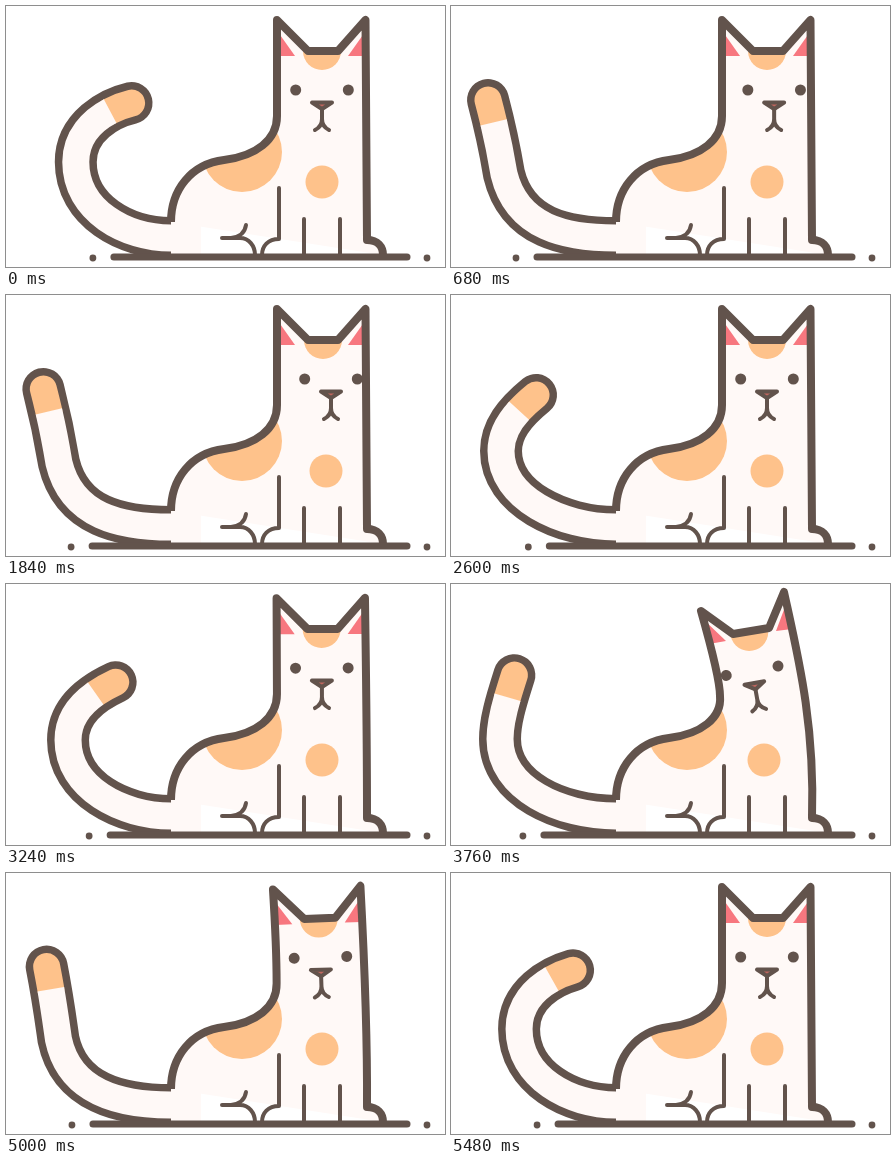
Write an HTML page with a canvas that moves like this. It is 439 px wide and 261 px high and loops after 5520 ms.

```html
<!DOCTYPE html>
<html>
<head>
<meta charset="utf-8">
<style>
html, body { margin: 0; width: 439px; height: 261px; overflow: hidden; background: #fff; }
canvas { display: block; }
</style>
</head>
<body>
<canvas id="stage" width="439" height="261"></canvas>
<script>
const ctx = document.getElementById('stage').getContext('2d');
const LOOP = 5520, STEP = 40;
const BROWN = '#62534c', FUR = '#fff9f7', ORANGE = '#fec28b', PINK = '#f7777f';

// Timelines: [time, value] pairs, eased between neighbours
const SWISH = [[-435, 1], [20, 0], [680, 1], [1160, 0], [1820, 1], [2300, 0],
  [2950, 1], [3350, 0], [4010, 1], [4450, 0], [5085, 1], [5540, 0]];
const GAZE = [[540, 0], [740, 9], [1850, 9], [2080, 0], [3240, 0], [3500, -7], [4080, -7], [4300, 0]];
const CHEST = [[680, 0], [1240, 4], [1880, 4], [2240, 0], [3300, 0], [3680, -3], [4080, -3], [4440, 0]];
const TILT = [[3200, 0], [3640, 1], [4680, 1], [5130, 0]];

// Tail centre line from tip to base: [swish, tip, c, c, middle, c, c]
const TAIL = [
  [0, 126, 97, 104, 102, 70, 120, 70, 156, 70, 205, 120, 232],
  [.44, 85, 100, 63, 118, 50, 135, 50, 156, 50, 203, 110, 232],
  [.69, 63, 91, 54, 120, 49, 138, 49, 155, 49, 205, 110, 232],
  [1, 37, 94, 46, 128, 50, 150, 53, 168, 66, 222, 115, 232]
];

const lerp = (a, b, k) => a + (b - a) * k;

function track(keys, t) {
  if (t <= keys[0][0]) return keys[0][1];
  for (let i = 1; i < keys.length; i++) {
    const [t0, a] = keys[i - 1], [t1, b] = keys[i];
    if (t < t1) return lerp(a, b, (1 - Math.cos(Math.PI * (t - t0) / (t1 - t0))) / 2);
  }
  return keys[keys.length - 1][1];
}

function stroke(path, width, color = BROWN, cap = 'round') {
  ctx.lineWidth = width;
  ctx.strokeStyle = color;
  ctx.lineCap = cap;
  ctx.lineJoin = 'round';
  ctx.stroke(path);
}

function fill(path, color) {
  ctx.fillStyle = color;
  ctx.fill(path);
}

function disc(x, y, r, color) {
  const p = new Path2D();
  p.arc(x, y, r, 0, 7);
  fill(p, color);
}

function tailPath(s) {
  const i = Math.max(1, TAIL.findIndex(k => k[0] >= s));
  const a = TAIL[i - 1], b = TAIL[i], k = (s - a[0]) / (b[0] - a[0]);
  const p = a.map((v, j) => lerp(v, b[j], k)).slice(1);
  const path = new Path2D();
  path.moveTo(p[0], p[1]);
  path.bezierCurveTo(...p.slice(2, 8));
  path.bezierCurveTo(...p.slice(8), 165, 232);
  path.lineTo(171, 232);
  return path;
}

function bodyPath(k) {
  const m = (x0, y0, x1, y1) => [lerp(x0, x1, k), lerp(y0, y1, k)];
  const p = new Path2D();
  p.moveTo(165, 216);
  p.bezierCurveTo(165, 184, 185, 158, 218, 154);
  p.bezierCurveTo(250, 150, 271, 134, ...m(271, 110, 269, 112));
  p.quadraticCurveTo(...m(271, 70, 269, 94), ...m(271, 14, 250, 27));
  p.lineTo(...m(302, 45, 282, 50));
  p.lineTo(...m(332, 45, 318, 44));
  p.lineTo(...m(359.5, 14, 333, 8));
  p.bezierCurveTo(...m(360, 70, 347, 72), ...m(361, 150, 364, 140), 361, 234);
  p.bezierCurveTo(372, 234, 377, 241, 377, 249);
  return p;
}

function triangle(pts, k) {
  const p = new Path2D();
  pts.forEach(([x0, y0, x1, y1]) => p.lineTo(lerp(x0, x1, k), lerp(y0, y1, k)));
  p.closePath();
  fill(p, PINK);
}

const LEGS = new Path2D('M273 182V233C262 233 256 240 256 249M298 213V249M334 213V249' +
  'M216 232H234C243 232 249 240 249 249M225 232C234 231 239 226 240 219');
const NOSE = new Path2D('M-10 12.5H10L0 19Z');
const MOUTH = new Path2D('M0 19V29C0 34-3 38-7 40M0 29C0 34 3 38 7 40');

function drawFace(k, gaze) {
  ctx.save();
  ctx.translate(lerp(316, 308, k), lerp(84, 85.5, k));
  ctx.rotate(-k * .178);
  ctx.translate(gaze, 0);
  disc(-26.3, 0, 5.5, BROWN);
  disc(26.3, 0, 5.5, BROWN);
  fill(NOSE, '#c0675f');
  stroke(NOSE, 4);
  stroke(MOUTH, 4);
  ctx.restore();
}

function draw(t) {
  const swish = track(SWISH, t), tilt = track(TILT, t), chest = track(CHEST, t);
  const tail = tailPath(swish), body = bodyPath(tilt);
  ctx.fillStyle = '#fff';
  ctx.fillRect(0, 0, 439, 261);

  stroke(tail, 42);
  fill(body, FUR);
  ctx.fillStyle = FUR;
  ctx.fillRect(165, 216, 30, 36);

  ctx.save();
  ctx.clip(body);
  disc(236, 146, 40, ORANGE);
  disc(lerp(316, 299, tilt) + chest / 4, lerp(45, 48, tilt), 19, ORANGE);
  triangle([[272, 26, 252, 35], [289, 50, 275, 57], [272, 50, 258, 60]], tilt);
  triangle([[359, 26, 334, 23], [342, 50, 325, 47], [359, 50, 341, 45]], tilt);
  ctx.restore();
  disc(316 + chest, 176, 16.5, ORANGE);

  stroke(body, 8, BROWN, 'butt');
  // Fur leaves the tip of the tail orange
  ctx.save();
  ctx.setLineDash([23, 999]);
  stroke(tail, 27, ORANGE);
  ctx.setLineDash([0, 23, 999, 0]);
  stroke(tail, 27, FUR, 'butt');
  ctx.restore();
  // Restore the orange cap beyond the tip, then the rest of the cat
  stroke(LEGS, 4);
  drawFace(tilt, track(GAZE, t));

  const left = 87 - 22 * swish;
  stroke(new Path2D(`M${left + 21} 251H401`), 7);
  disc(left, 252, 3.4, BROWN);
  disc(421, 252, 3.4, BROWN);
}

const start = performance.now();
function tick() {
  const t = (performance.now() - start) % LOOP;
  draw(Math.floor(t / STEP) * STEP);
  requestAnimationFrame(tick);
}
tick();
</script>
</body>
</html>
```
